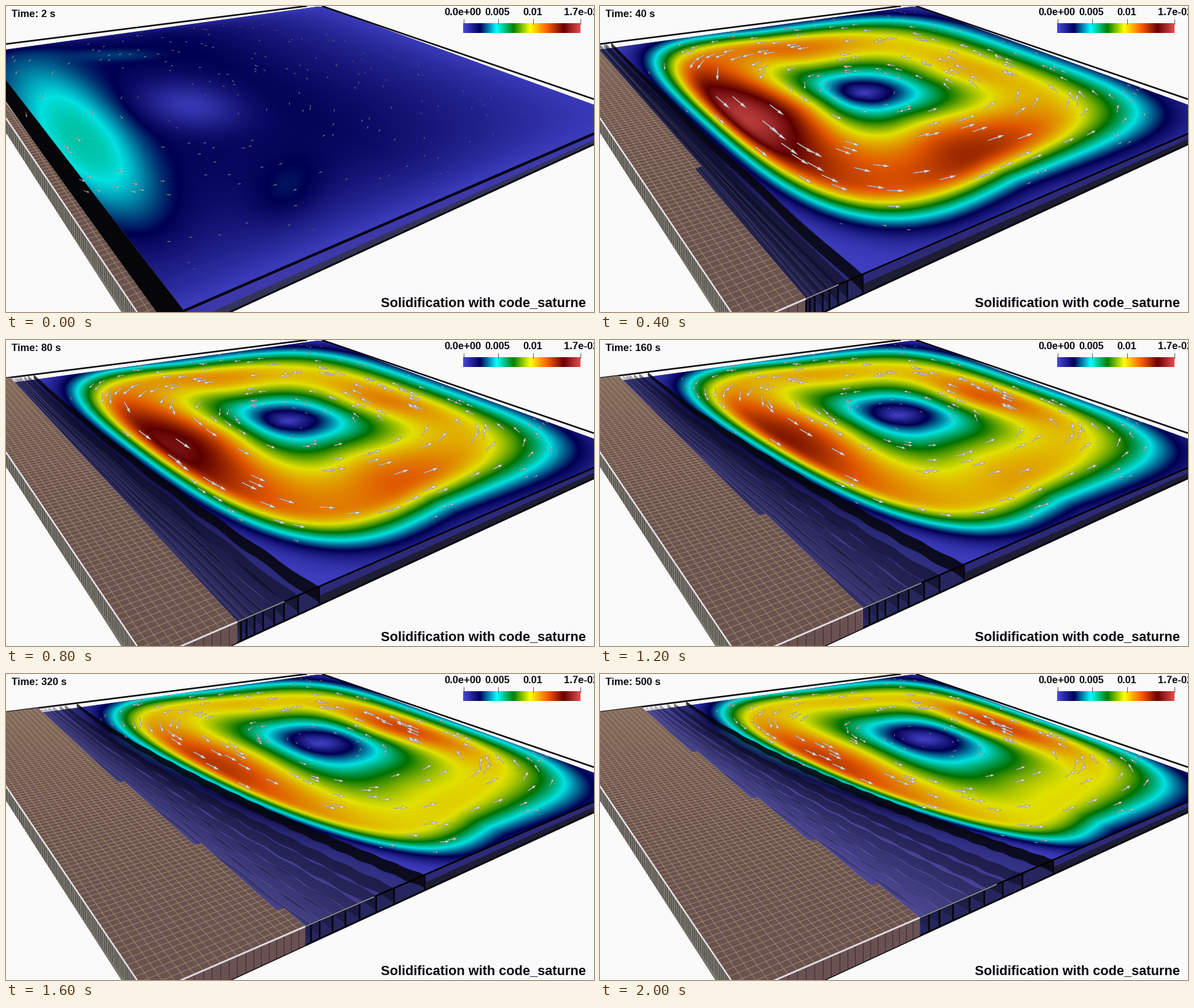
Recreate the animation shown at these times as a matplotlib script. Size 957 by 499 pixels, loop 2.4 s.

```python
import numpy as np
import matplotlib.pyplot as plt
from matplotlib.animation import FuncAnimation
from matplotlib.collections import LineCollection, PolyCollection
from matplotlib.colors import to_rgba
from matplotlib.patches import Polygon

W, H, DPI = 957, 499, 64
CELLS = 100
SECONDS = [2, 40, 80, 160, 320, 500]

fig = plt.figure(figsize=(W / DPI, H / DPI), dpi=DPI, facecolor="#fafafa")
ax = fig.add_axes([0, 0, 1, 1])

STOPS = np.linspace(0, 1, 8)
RAMP = np.array([(71, 71, 219), (0, 0, 92), (0, 255, 255), (0, 128, 0),
                 (255, 255, 0), (255, 97, 0), (107, 0, 0), (224, 77, 77)])


def colour(t):
    return np.stack([np.interp(t, STOPS, RAMP[:, k]) for k in range(3)], -1)


def front(x):
    return 622.6 - 0.433 * np.asarray(x, float)


def floor(x):
    return 667.6 - 0.462 * np.asarray(x, float)


# perspective of the plate: unit square to its four corners on the stage
CORNERS = np.array([(229.4, 523), (1029, 177), (512, -1), (-75, 71)], float)
UNIT = [(0, 0), (1, 0), (1, 1), (0, 1)]


def homography():
    rows, rhs = [], []
    for (u, v), (x, y) in zip(UNIT, CORNERS):
        rows += [[u, v, 1, 0, 0, 0, -u * x, -v * x],
                 [0, 0, 0, u, v, 1, -u * y, -v * y]]
        rhs += [x, y]
    return np.append(np.linalg.solve(rows, rhs), 1).reshape(3, 3)


PLATE = homography()


def project(m, a, b):
    p = np.tensordot(m, np.stack([a, b, np.ones_like(a)]), 1)
    return p[0] / p[2], p[1] / p[2]


Y, X = np.mgrid[0:H, 0:W] + 0.5
U, V = project(np.linalg.inv(PLATE), X, Y)
VC = np.clip(V, 0, 1)
FIELD = [(0, 71), (507, 1), (520, 2), (W, 161), (W, 208), (290, 497), (0, 121)]


class Start:
    """Weak flow before any solid has formed."""

    def __init__(self):
        self.rho = np.hypot(X - 300, 2 * (Y - 162))
        self.q = np.ones_like(X)

    def blob(self, x0, y0, a, b, deg=0, power=2.0):
        c, s = np.cos(np.radians(deg)), np.sin(np.radians(deg))
        dx, dy = X - x0, Y - y0
        d = np.hypot((dx * c + dy * s) / a, (dy * c - dx * s) / b)
        return np.exp(-1.8 * d ** power)

    def speed(self):
        t = 0.14 * (1 - np.exp(-VC / 0.1)) * (1 - np.exp((VC - 1) / 0.04))
        t *= np.clip((1 - U) / 0.55, 0, 1) ** 0.8
        t -= 0.12 * self.blob(300, 162, 115, 52, 8)
        t += 0.185 * self.blob(125, 220, 195, 88, 48, 2.6)
        t += 0.04 * self.blob(178, 80, 95, 14)
        t += 0.05 * self.blob(460, 303, 85, 62, -35)
        return np.clip(t, 0.01, 1)

    def rgb(self, speed):
        return colour(speed) * 0.88


class Growth:
    """One vortex beside a solid that grows from the left wall."""

    def __init__(self, seconds):
        lo, hi = 40 ** 0.25, 500 ** 0.25
        self.p = p = (seconds ** 0.25 - lo) / (hi - lo)
        u0 = self.edge(1, VC)
        uc, vc = 0.44 + 0.18 * p ** 0.85, 0.45 + 0.04 * p
        xi = np.where(U < uc, (U - uc) / (uc - u0), (U - uc) / (1 - uc))
        xi = np.where(xi < -1, -1 + 0.35 * (xi + 1), xi)
        eta = np.where(V < vc, (V - vc) / vc, (V - vc) / (1 - vc))
        # round near the core, almost square near the walls
        n = 2 + 2 * np.clip(np.hypot(xi, eta), 0, 1)
        self.rho = (abs(xi) ** n + abs(eta) ** n) ** (1 / n)
        self.phi = np.arctan2(eta, xi)
        s, l = self.edge(0, VC), u0
        self.q = np.clip((U - s) / (l - s), 0, 1)

    def edge(self, q, v):
        """Plate coordinate u of the solid (q=0) to liquid (q=1) lines."""
        p, bow = self.p, (1 - v) ** 2
        solid = 0.075 + 0.1 * p + (0.053 * p - 0.011) * bow
        liquid = 0.115 + 0.17 * p + (0.023 + 0.155 * p) * bow
        return solid + (liquid - solid) * q

    def wall(self, q, n=500):
        v = np.linspace(1, 0, n)
        u = self.edge(q, v)
        if q == 0:
            u = np.ceil(u * CELLS) / CELLS
        else:
            turn = 2 * np.pi * CELLS * u
            u = u - 0.9 * np.sin(turn) / (2 * np.pi * CELLS)
        return np.stack(project(PLATE, u, v), 1)

    def speed(self):
        p, fade = self.p, (1 - self.p) ** 2

        def bump(deg):
            return np.exp(4 * (np.cos(self.phi - np.radians(deg)) - 1))

        amp = (0.52 + (0.23 + 0.22 * fade) * bump(180)
               + (0.05 + 0.21 * fade) * bump(-90)
               + (0.22 - 0.12 * fade) * bump(0)
               + (0.08 + 0.08 * fade) * bump(90))
        c = np.cos(self.phi)
        crest = 0.63 + 0.08 * p - 0.12 * c - 0.04 * np.sin(self.phi)
        rim = 0.88 + 0.05 * p + 0.07 * np.clip(-c, 0, 1)
        core = 0.19 + 0.09 * p
        power = np.log(np.arcsin(0.285 / amp) * 2 / np.pi) / np.log(core / crest)
        rise = amp * np.sin(np.pi / 2 * np.clip(self.rho / crest, 0, 1) ** power)
        out = np.clip((self.rho - crest) / (rim - crest), 0, 4)
        fall = amp * np.exp(-np.log(amp / 0.285) * out ** 2.3)
        return np.where(self.rho < crest, rise, fall)

    def rgb(self, speed):
        base = colour(speed) * 0.88
        q = self.q[..., None]
        haze = (1 - q) * np.array([82, 77, 145]) * (0.55 + 0.45 * self.p)
        return np.where(q < 1, base * (0.15 + 0.5 * q) + haze, base)


FLOWS = [Start()] + [Growth(s) for s in SECONDS[1:]]
SPEEDS = [f.speed() for f in FLOWS]
IMAGES = [np.clip(f.rgb(t), 0, 255).astype(np.uint8)
          for f, t in zip(FLOWS, SPEEDS)]

rng = np.random.default_rng(5)
SEEDS = np.stack(project(PLATE, *rng.uniform(0.03, 0.97, (2, 230))), 1)
SEEDS = SEEDS[(SEEDS[:, 0] > 4) & (SEEDS[:, 0] < W - 8) & (SEEDS[:, 1] < H - 8)]


def arrows(flow, speed):
    shape = np.array([(0, -.7), (.62, -.8), (.6, -2.6), (1, 0), (.6, 2.6),
                      (.62, .8), (0, .7)])
    gy, gx = np.gradient(flow.rho)
    out = []
    for x, y in SEEDS:
        at = int(y), int(x)
        size = speed[at] * (24 + 0.06 * y)
        if flow.q[at] < 1 or size < 1.5:
            continue
        n = np.hypot(gx[at], gy[at]) + 1e-9
        dx, dy = gy[at] / n, -gx[at] / n
        px, py = shape.T * [[size], [min(1, size / 18)]]
        out.append(np.stack([x + px * dx - py * dy, y + px * dy + py * dx], 1))
    ax.add_collection(PolyCollection(out, facecolors="#dcd6d6", zorder=6,
                                     edgecolors="#6a6464", linewidths=0.4))


def poly(pts, fc, z, alpha=1):
    p = Polygon(pts, closed=True, fc=to_rgba(fc, alpha), ec="none", zorder=z)
    return ax.add_patch(p)


def line(x0, y0, x1, y1, c, px, z):
    ax.plot([x0, x1], [y0, y1], color=c, lw=px * 72 / DPI, zorder=z,
            solid_capstyle="butt")


def segments(segs, c, px, z, clip, alpha=1):
    lc = LineCollection(segs, colors=c, linewidths=px * 72 / DPI, zorder=z,
                        alpha=alpha)
    ax.add_collection(lc)
    lc.set_clip_path(clip)


def label(x, y, s, px, **kw):
    ax.text(x, y, s, fontsize=px * 72 / DPI, family="Liberation Sans",
            weight="bold", color="#080810", va="baseline", zorder=20, **kw)


def face(x0, x1, c, z, top=0.0):
    xs = np.array([x0, x1])
    f, g = front(xs), floor(xs)
    a = f + (g - f) * top
    return poly([(x0, a[0]), (x1, a[1]), (x1, g[1]), (x0, g[0])], c, z)


def tiles(outline):
    solid = poly(outline, "#6a524f", 4)
    k = np.arange(CELLS + 1) / CELLS
    kk, ends = np.array([k, k]), np.array([0 * k, 0 * k + 1])
    for a, b in ((kk, ends), (ends, kk)):
        segs = np.stack(project(PLATE, a, b), -1).swapaxes(0, 1)
        segments(segs, "#b49c78", 1.1, 4.1, solid, 0.65)


def left_side():
    side = poly([(-75, 71), (229, 523), (203, 523), (-75, 90)], "#77756c", 3)
    ys = np.arange(160, 520, 5.0)
    xs = (ys - 183) / 1.483
    segments([[(x, y), (x, y + 30)] for x, y in zip(xs, ys)], "#4a4942", 1, 3.1, side)
    line(-75, 71.8, 229.4, 523, "#e9e4e9", 2.5, 5)


def plate_edges(px):
    line(0, 62, 490, 0, "#0a0a10", 2.6, 3)
    line(514, 0, W, 152, "#0a0a10", 2.6, 3)
    line(290, 497, W, float(front(W)), "#000000", px, 4.5)
    line(290, float(floor(290)), W, float(floor(W)), "#08080c", 3, 2.5)


def sheets(flow):
    """Dark translucent walls standing between solid and liquid."""
    for q in (0.07, 0.14, 0.23, 0.33, 0.44, 0.58, 0.73, 1):
        p = flow.wall(q)
        low = p + np.stack([0 * p[:, 1], 3 + 0.055 * p[:, 1]], 1)
        alpha = 0.82 if q == 1 else 0.12 + 0.5 * q
        poly(np.vstack([p, low[::-1]]), "#06060c", 3.5, alpha)
        if q < 0.5:
            ax.plot(*p.T, color="#8a86c0", alpha=0.4, lw=0.8, zorder=3.6)
        x = p[-1, 0]
        line(x, float(front(x)), x, float(floor(x)), "#08080e", 3, 4.4)


def legend():
    bar = colour(np.linspace(0, 1, 191))[None].astype(np.uint8)
    ax.imshow(bar, extent=(744, 935, 44, 28), aspect="auto", zorder=15)
    for x in (744.5, 800.5, 857.5, 935):
        line(x, 21, x, 30, "#55555c", 1, 16)
    label(713, 15, "0.0e+00", 16.6)
    label(800, 15, "0.005", 16.2, ha="center")
    label(857, 15, "0.01", 16.2, ha="center")
    label(908, 15, "1.7e-02", 16.6, clip_on=True)


def open_plate():
    plate_edges(4.2)
    face(285, W, "#3c38aa", 2.2)
    face(285, W, "#34345a", 2.3, 0.6)
    poly([(0, 121), (290, 497), (290, 510), (245, 510), (0, 156)], "#060508", 3.2)
    tiles([(-75, 71), (0, 158), (245, 499), (229, 523)])


def growing_plate(flow):
    solid = flow.wall(0)
    xs, xl = solid[-1, 0], flow.wall(1)[-1, 0]
    plate_edges(2.6)
    face(xl, W, "#2c2a78", 2.2)
    face(xl, W, "#1d1d34", 2.3, 0.5)
    face(xs, xl, "#26265e", 2.2)
    sheets(flow)
    tiles(np.vstack([solid, CORNERS[[0, 3]]]))
    brown = face(229, xs, "#6b5252", 4)
    u = np.arange(CELLS) / CELLS
    bx, by = project(PLATE, u, 0 * u)
    segments([[(a, b), (a, b + 45)] for a, b in zip(bx, by)],
             "#3d3232", 1.2, 4.2, brown)
    line(229, float(front(229)), xs, float(front(xs)), "#e2dcdf", 3, 5)
    xm = xs + 0.58 * (xl - xs)
    line(xs, float(front(xs)), xm, float(front(xm)), "#8c8c98", 2, 4.8)


def draw(i):
    ax.cla()
    ax.axis("off")
    flow = FLOWS[i]
    clip = poly(FIELD, "#3c3aa8", 1)
    img = ax.imshow(IMAGES[i], extent=(0, W, H, 0), interpolation="nearest", zorder=2)
    img.set_clip_path(clip)
    left_side()
    if i == 0:
        open_plate()
    else:
        growing_plate(flow)
    arrows(flow, SPEEDS[i])
    legend()
    label(9, 18, f"Time: {SECONDS[i]} s", 16.5)
    label(610, 490, "Solidification with code_saturne", 21.8)
    ax.set_xlim(0, W)
    ax.set_ylim(H, 0)
    ax.set_aspect("auto")
    return []


anim = FuncAnimation(fig, draw, frames=len(SECONDS), init_func=lambda: draw(0),
                     interval=400, repeat=True, repeat_delay=0, blit=False)
plt.show()
```
